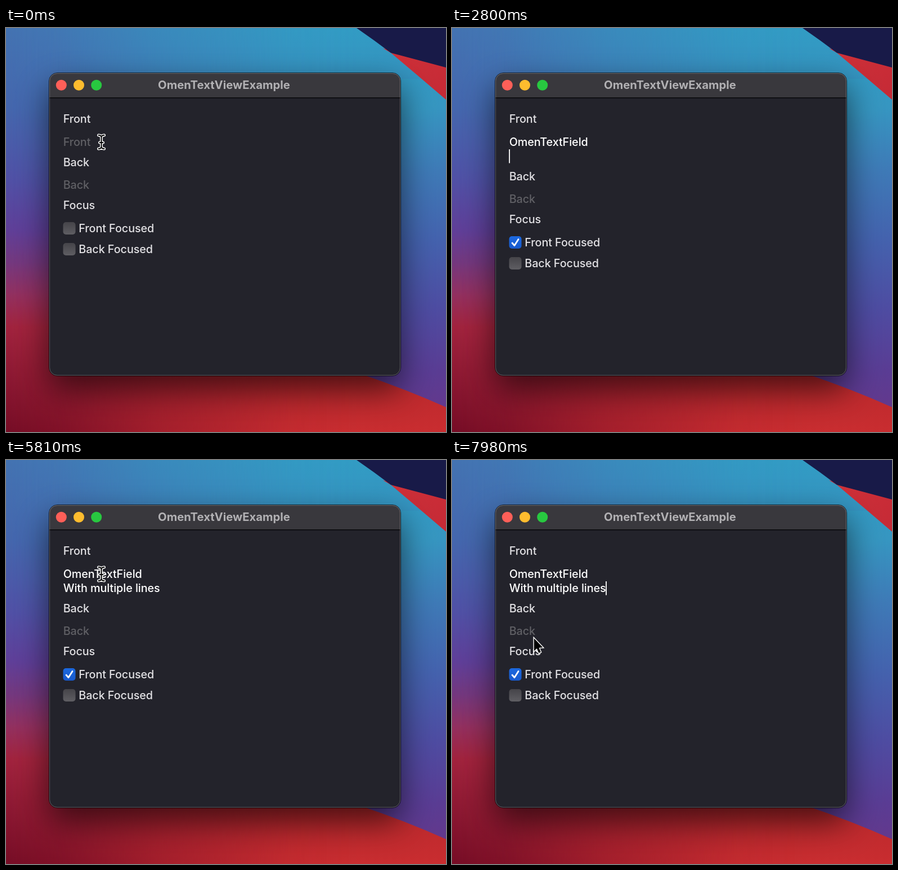
Write an HTML page with a canvas that moves like this. It is 782x716 px and loops after 8 s.

```html
<!DOCTYPE html>
<html lang="en">
<head>
<meta charset="utf-8">
<title>Text field focus</title>
<style>
html, body { margin: 0; width: 100%; height: 100%; overflow: hidden; background: #23232b; }
canvas { display: block; width: 782px; height: 716px; }
</style>
</head>
<body>
<canvas></canvas>
<script>
const W = 782, H = 716, LOOP = 8000, STEP = 70;
const canvas = document.querySelector('canvas');
const scale = window.devicePixelRatio || 1;
canvas.width = W * scale;
canvas.height = H * scale;
const ctx = canvas.getContext('2d');
ctx.scale(scale, scale);

const LABEL = '#e2e1e4', TYPED = '#ffffff', HINT = '#606065';
const LEFT = 101.7, LINE = 25;
const FOCUS_FRONT = 350, FOCUS_BACK = 6580, REFOCUS_FRONT = 7490;

// Typed runs: start time, time per key, text
const RUNS = [
  [720, 110, 'OmenTextField'],
  [2600, 0, '\n'],
  [2900, 85, 'With mult'],
  [4250, 120, 'ipl'],
  [4610, 100, 'e lines']
];
// Key badge: letter, shown from, gone at
const BADGES = [['O', 720, 1160], ['T', 1160, 1600], ['F', 1600, 2800], ['W', 2900, 4200]];
// Pointer path: time, x, y
const PATH = [
  [0, 169, 202], [5850, 169, 202], [6400, 112, 417], [7000, 112, 417],
  [7300, 112, 379], [7700, 112, 379], [7980, 145, 315], [8050, 152, 302]
];

const clamp = v => Math.max(0, Math.min(1, v));
const ease = v => v * v * (3 - 2 * v);

function gradient(x0, y0, x1, y1, ...stops) {
  const g = ctx.createLinearGradient(x0, y0, x1, y1);
  stops.forEach(([at, color]) => g.addColorStop(at, color));
  return g;
}

function shape(points, fill, stroke, width) {
  ctx.beginPath();
  points.forEach(([x, y]) => ctx.lineTo(x, y));
  ctx.closePath();
  paint(fill, stroke, width);
}

function paint(fill, stroke, width) {
  if (stroke) {
    ctx.strokeStyle = stroke;
    ctx.lineWidth = width;
    ctx.stroke();
  }
  if (fill) {
    ctx.fillStyle = fill;
    ctx.fill();
  }
}

function box(x, y, w, h, r, fill, stroke, width) {
  ctx.beginPath();
  ctx.roundRect(x, y, w, h, r);
  paint(fill, stroke, width);
}

function disc(x, y, r, fill, stroke, width) {
  ctx.beginPath();
  ctx.arc(x, y, r, 0, 7);
  paint(fill, stroke, width);
}

function setFont(size, weight, spacing = 0) {
  ctx.font = `${weight} ${size}px Inter, sans-serif`;
  ctx.letterSpacing = spacing + 'px';
}

function write(text, x, y, color) {
  ctx.fillStyle = color;
  ctx.fillText(text, x, y);
}

function wallpaper() {
  ctx.fillStyle = gradient(0, 0, 0, H, [0, '#4473b2'], [0.2, '#4566ae'], [0.38, '#5150a6'],
    [0.5, '#603f99'], [0.58, '#74387f'], [0.66, '#933060'], [0.74, '#a2233e'], [1, '#760d26']);
  ctx.fillRect(0, 0, W, H);

  // Right-hand tones, faded in across the stage
  const far = document.createElement('canvas');
  far.width = W;
  far.height = H;
  const c = far.getContext('2d');
  const tones = c.createLinearGradient(0, 0, 0, H);
  [[0, '#329cc4'], [0.3, '#3888bc'], [0.5, '#5048a0'], [0.7, '#a82838'], [0.86, '#ba282c'], [1, '#c92d30']]
    .forEach(s => tones.addColorStop(...s));
  c.fillStyle = tones;
  c.fillRect(0, 0, W, H);
  c.globalCompositeOperation = 'destination-in';
  const fade = c.createLinearGradient(0, 0, W, 0);
  [[0, 0], [0.12, 0.12], [0.35, 0.55], [0.65, 0.93], [0.8, 1]]
    .forEach(([at, a]) => fade.addColorStop(at, `rgba(0,0,0,${a})`));
  c.fillStyle = fade;
  c.fillRect(0, 0, W, H);
  ctx.drawImage(far, 0, 0);

  // Blue to purple band
  ctx.beginPath();
  ctx.moveTo(600, 90);
  ctx.lineTo(W, 90);
  ctx.lineTo(W, 672);
  ctx.quadraticCurveTo(708, 639, 630, 613);
  ctx.lineTo(600, 600);
  ctx.closePath();
  paint(gradient(690, 80, 782, 680, [0, '#329ac3'], [0.12, '#3696c1'], [0.3, '#3e7ab7'],
    [0.5, '#4462ae'], [0.7, '#4e4ca2'], [0.88, '#5a3c94'], [1, '#64388c']));

  // Corner layers
  ctx.beginPath();
  ctx.moveTo(670, 36);
  ctx.lineTo(W, 60);
  ctx.lineTo(W, 127);
  ctx.quadraticCurveTo(734, 86, 684, 44);
  ctx.closePath();
  paint(gradient(690, 40, 782, 120, [0, '#d03038'], [1, '#c52a36']));
  ctx.beginPath();
  ctx.moveTo(623, 0);
  ctx.lineTo(W, 0);
  ctx.lineTo(W, 70);
  ctx.lineTo(684, 44);
  ctx.quadraticCurveTo(655, 22, 623, 0);
  paint('#181a48');
}

function windowFrame() {
  ctx.save();
  ctx.shadowColor = 'rgba(0,0,0,.62)';
  ctx.shadowBlur = 58 * scale;
  ctx.shadowOffsetY = 24 * scale;
  box(77, 80, 624, 536, 14, '#23232b');
  ctx.restore();
  box(76.5, 79.5, 625, 537, 14.5, null, 'rgba(0,0,0,.75)', 1);

  ctx.save();
  box(77, 80, 624, 536, 14, '#23232b');
  ctx.clip();
  ctx.fillStyle = '#39383d';
  ctx.fillRect(77, 80, 624, 43);
  ctx.fillStyle = '#08080a';
  ctx.fillRect(77, 123, 624, 1.5);
  ctx.restore();
  box(77.5, 80.5, 623, 535, 13.5, null, 'rgba(255,255,255,.26)', 1);

  ['#fe5f58', '#febc2e', '#28c840'].forEach((color, i) => disc(98.3 + 31.2 * i, 101.3, 9.5, color));
  setFont(20.3, 700);
  ctx.textAlign = 'center';
  write('OmenTextViewExample', 387.5, 107.8, '#b1b0b3');
  ctx.textAlign = 'left';
}

function checkbox(label, y, on) {
  const top = y - 11;
  box(101.5, top, 22, 22, 5, on
    ? gradient(0, top, 0, top + 22, [0, '#1c69e0'], [1, '#1759cc'])
    : gradient(0, top, 0, top + 22, [0, '#454449'], [1, '#5f5e63']));
  if (on) {
    ctx.beginPath();
    ctx.moveTo(107, y + 1);
    ctx.lineTo(111, y + 5.5);
    ctx.lineTo(118, y - 5.5);
    ctx.lineCap = ctx.lineJoin = 'round';
    paint(null, '#fff', 2.8);
  }
  write(label, 129.3, y + 7, LABEL);
}

function typedAt(t) {
  let text = '', last = 0;
  for (const [start, gap, run] of RUNS) {
    if (t < start) break;
    const n = gap ? Math.min(run.length, Math.floor((t - start) / gap) + 1) : run.length;
    text += run.slice(0, n);
    last = start + (n - 1) * gap;
  }
  return { text, last };
}

function caret(x, y, age) {
  if (age % 1120 >= 560) return;
  ctx.fillStyle = '#fff';
  ctx.fillRect(x, y - 12, 1.8, 24.5);
}

function form(t) {
  const { text, last } = typedAt(t);
  const lines = text.split('\n');
  const shift = (lines.length - 1) * LINE;
  const back = t >= FOCUS_BACK && t < REFOCUS_FRONT;
  const front = t >= FOCUS_FRONT && !back;

  setFont(19.8, 500, -0.08);
  write('Front', LEFT, 168, LABEL);
  if (t < 840) write('Front', LEFT, 209, HINT);
  lines.forEach((line, i) => write(line, LEFT, 209 + i * LINE, TYPED));
  write('Back', LEFT, 245 + shift, LABEL);
  write('Back', LEFT, 285 + shift, HINT);
  write('Focus', LEFT, 321 + shift, LABEL);
  checkbox('Front Focused', 355 + shift, front);
  checkbox('Back Focused', 392 + shift, back);

  if (front) {
    const since = t >= REFOCUS_FRONT ? REFOCUS_FRONT : Math.max(FOCUS_FRONT, last);
    const end = lines[lines.length - 1];
    caret(LEFT + ctx.measureText(end).width - 0.5, 202 + shift, t - since);
  }
  if (back) caret(LEFT - 0.5, 278 + shift, t - FOCUS_BACK);
}

function badge(t) {
  const item = BADGES.find(([, from, to]) => t >= from && t < to);
  if (!item) return;
  const [letter, , end] = item;
  setFont(70, 400);
  const width = 150 + ctx.measureText(letter).width;
  const x = 391.5 - width / 2;
  ctx.save();
  ctx.globalAlpha = letter === 'F' || letter === 'W' ? clamp((end - t) / 250) : 1;
  box(x, 550, width, 113, 25, 'rgba(36,27,29,.94)');
  ctx.lineJoin = 'round';
  const arrow = [[75, 587], [101, 612], [87, 612], [87, 630.5], [63, 630.5], [63, 612], [49, 612]];
  shape(arrow.map(([dx, y]) => [x + dx, y]), null, '#fff', 6);
  write(letter, x + 110, 633, '#fff');
  ctx.restore();
}

function pointerAt(t) {
  const i = PATH.findIndex(p => p[0] > t);
  const [t0, x0, y0] = PATH[i - 1], [t1, x1, y1] = PATH[i];
  const k = ease((t - t0) / (t1 - t0));
  return [x0 + (x1 - x0) * k, y0 + (y1 - y0) * k];
}

function ring(t, x, y) {
  for (const click of [FOCUS_FRONT, FOCUS_BACK, REFOCUS_FRONT]) {
    const age = t - click + 70;
    if (age < 0 || age > 350) continue;
    ctx.globalAlpha = 0.92 * clamp((350 - age) / 130);
    disc(x, y + 2.3, 38, null, '#2159ab', 4.8);
    ctx.globalAlpha = 1;
  }
}

function beam(x, y) {
  ctx.beginPath();
  for (const s of [-1, 1]) {
    ctx.moveTo(x - 5, y + 12 * s);
    ctx.quadraticCurveTo(x, y + 12 * s, x, y + 8 * s);
    ctx.quadraticCurveTo(x, y + 12 * s, x + 5, y + 12 * s);
  }
  ctx.moveTo(x, y - 9);
  ctx.lineTo(x, y + 9);
  ctx.moveTo(x - 3, y + 1);
  ctx.lineTo(x + 3, y + 1);
  ctx.lineCap = ctx.lineJoin = 'round';
  paint(null, '#fff', 5);
  paint(null, '#000', 2);
}

function pointer(t) {
  if (t >= 720 && t < 5600) return;
  const [x, y] = pointerAt(t);
  ring(t, x, y);
  if (y < 242) return beam(x + 0.5, y);
  const arrow = [[0, 0], [0, 22.5], [5, 18], [8.4, 26], [12, 24.5], [8.7, 16.7], [15.5, 16.3]];
  ctx.lineJoin = 'miter';
  shape(arrow.map(([dx, dy]) => [x + 0.8 + dx, y + 1 + dy]), '#000', '#fff', 2.8);
}

// The still scenery is painted once and reused
wallpaper();
windowFrame();
const scenery = document.createElement('canvas');
scenery.width = canvas.width;
scenery.height = canvas.height;
scenery.getContext('2d').drawImage(canvas, 0, 0);

function draw(now) {
  const t = Math.floor((now % LOOP) / STEP) * STEP;
  ctx.drawImage(scenery, 0, 0, W, H);
  form(t);
  badge(t);
  pointer(t);
}

function tick() {
  draw(performance.now());
  requestAnimationFrame(tick);
}
tick();
</script>
</body>
</html>
```
